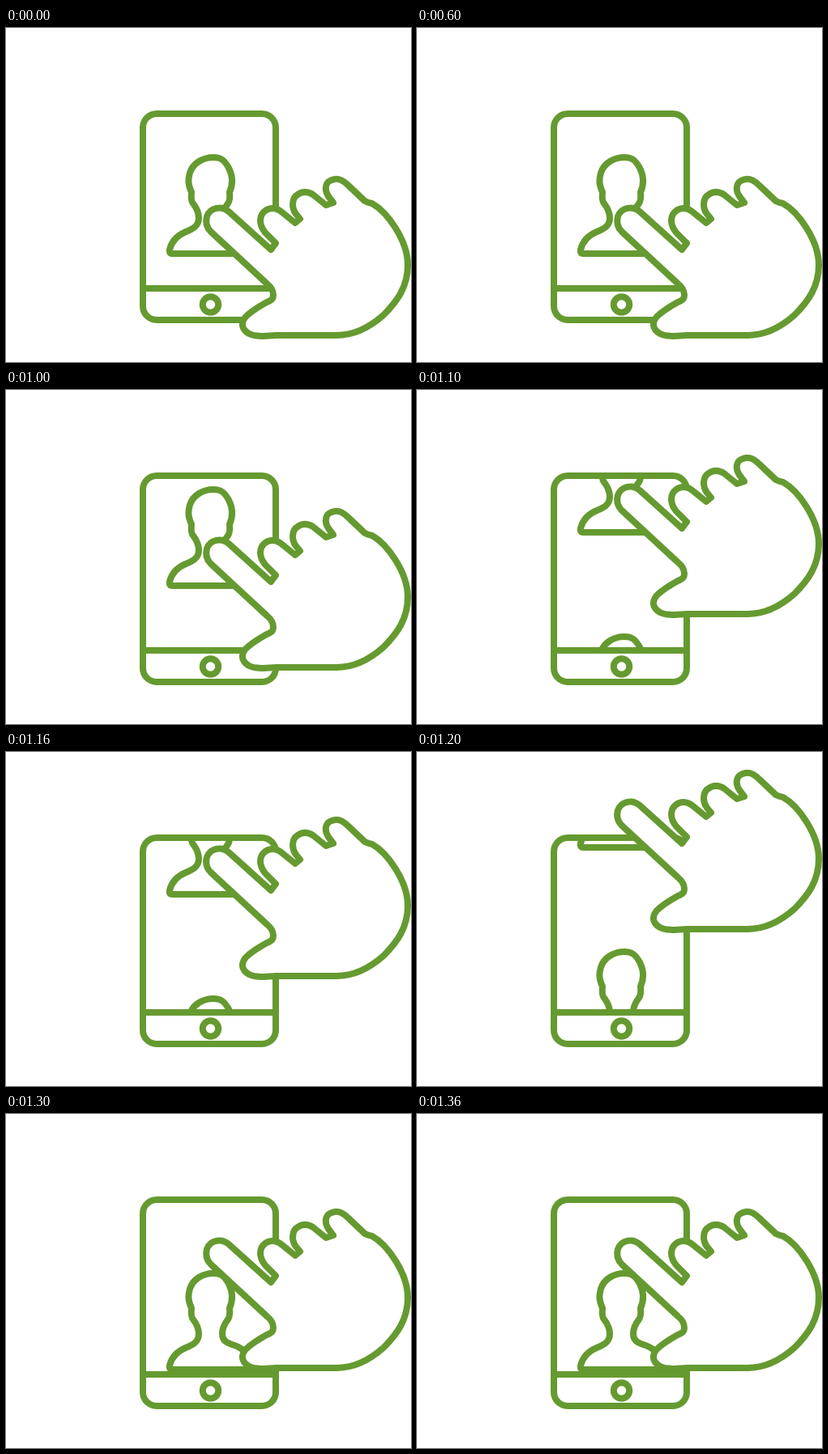
An HTML page for the animation above (1400 ms loop, 500x413 px).

```html
<!DOCTYPE html>
<html lang="en">
<head>
<meta charset="utf-8">
<title>Swipe up</title>
<style>
  html, body { margin: 0; height: 100%; overflow: hidden; background: #fff; }
  svg { display: block; width: 100vw; height: 100vh; }
</style>
</head>
<body>
<svg viewBox="0 0 500 413" fill="none" stroke="#659a30" stroke-width="8" stroke-linejoin="round">
  <defs>
    <clipPath id="screen"><path d="M169 106H333V322H169Z"/></clipPath>
    <path id="person" d="M300 279H205Q201 279 202 274C205 262 212 256 222 252C232 248 238 244 238 235
      C238 226 234 221 231 217Q228 214 229 203C224 192 225 186 227 179C231 167 243 160 256 160
      C266 160 270 164 275 173C280 183 281 192 276 203Q277 213 274 217C270 222 267 227 267 235
      C267 243 272 246 282 249C293 253 301 262 304 274Q305 279 300 279Z"/>
  </defs>
  <g clip-path="url(#screen)">
    <g id="feed">
      <use href="#person"/>
      <use href="#person" y="248"/>
    </g>
  </g>
  <rect x="169" y="106" width="164" height="255" rx="17"/>
  <path d="M169 322H333"/>
  <circle cx="252.5" cy="342" r="9.7"/>
  <path id="hand" fill="#fff" d="M275 227L327 274L333 266L320 253C312 243 312 232 320 226
    C327 221 335 223 341 228L357 241L363 236L358 230C352 222 353 210 360 206
    C367 201 374 203 379 206L395 219L404 216L398 208C392 199 395 190 402 188
    C411 184 418 190 423 195L443 214Q447 216 452 217C470 227 496 262 496 293
    C496 320 483 338 466 355C448 371 430 380 408 380H333C318 381 308 382 300 378
    C290 372 290 364 296 357C304 349 313 344 322 339C330 336 330 333 330 330
    C330 324 327 320 322 316L253 252C247 246 246 240 248 233C252 222 266 219 275 227Z"/>
</svg>
<script>
  const feed = document.getElementById('feed');
  const hand = document.getElementById('hand');
  const HOLD = 1000, STEP = 100, LOOP = 1400;

  // Vertical offsets: rest, three swipe steps, return.
  const feedY = [0, -37, -103, -161, -211];
  const handY = [0, -37, -103, -161, -66];

  const moveY = (el, y) => el.setAttribute('transform', `translate(0 ${y})`);

  function draw() {
    const t = performance.now() % LOOP;
    const step = t < HOLD ? 0 : 1 + Math.floor((t - HOLD) / STEP);
    moveY(feed, feedY[step]);
    moveY(hand, handY[step]);
    requestAnimationFrame(draw);
  }
  draw();
</script>
</body>
</html>
```
